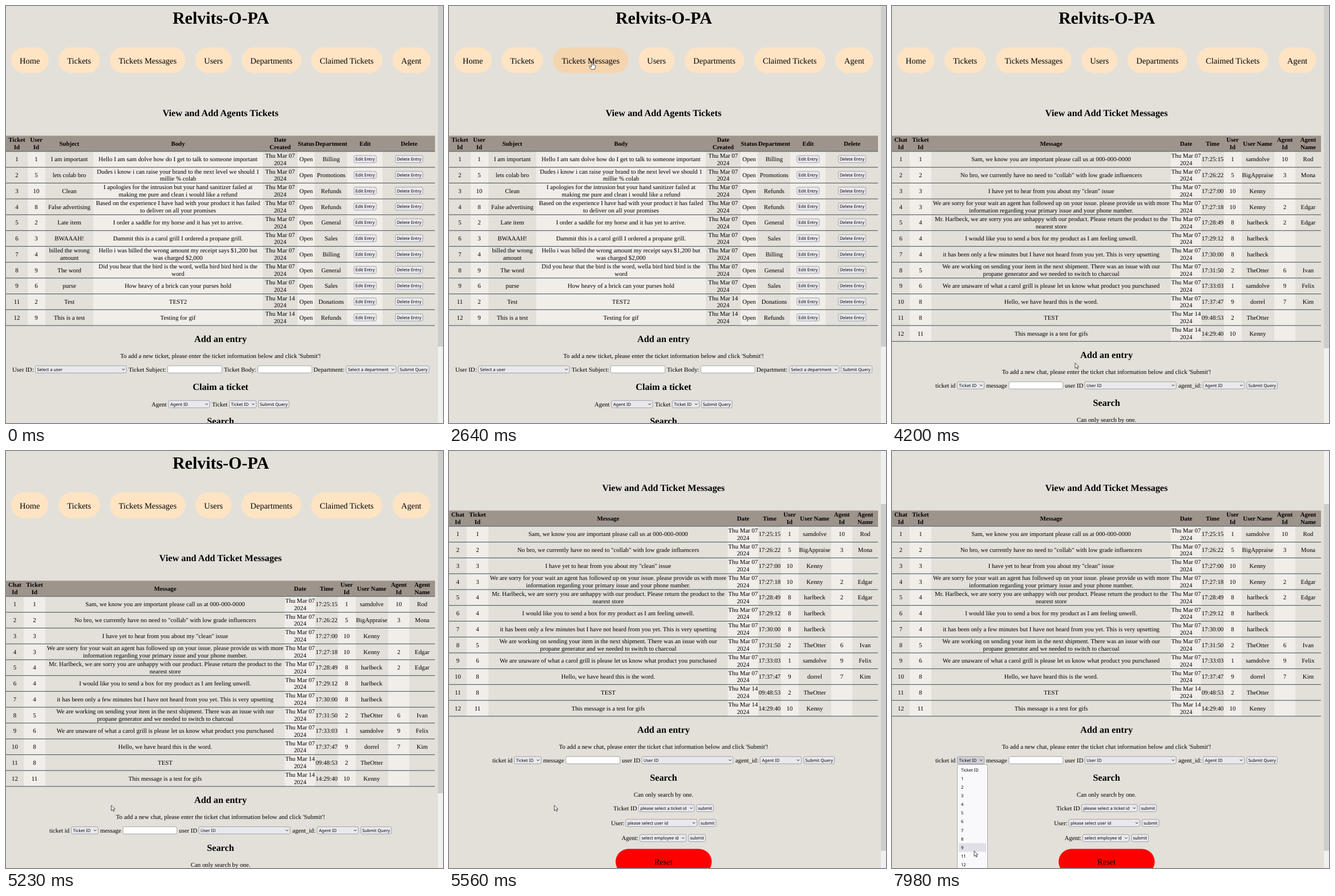
Recreate the animation shown at these times as an HTML page. Size 766 px wide and 731 px high, loop 8 s.

```html
<!DOCTYPE html>
<html lang="en">
<head>
<meta charset="utf-8">
<title>Ticket messages</title>
<style>
  html, body { margin: 0; width: 100%; height: 100%; overflow: hidden; background: #e3e0d9; }
  svg { display: block; font: 10.86px "Liberation Serif", "Times New Roman", serif; text-rendering: geometricPrecision; }
  .mid { text-anchor: middle; }
  .h1 { font-size: 29.95px; font-weight: bold; }
  .h2 { font-size: 16.27px; font-weight: bold; }
  .th { font-weight: bold; }
  .nav { font-size: 14.45px; }
  .ui { font: 7.5px "Noto Sans", "Open Sans", sans-serif; }
  .box { stroke: #8f8f9d; stroke-width: .8; }
</style>
</head>
<body>
<svg id="stage" width="766" height="731" viewBox="0 0 766 731"></svg>
<script>
const ROW = 27.75, MID = 376;
const GREY = '#e9e9ed', BISQUE = '#ffe4c4', HOVER = '#f5d5ae';

const rect = (x, y, w, h, fill, more = '') =>
  `<rect x="${x}" y="${y}" width="${w}" height="${h}" fill="${fill}" ${more}/>`;
const text = (x, y, s, cls = '') => `<text x="${x}" y="${y}" class="${cls}">${s}</text>`;
const mid = (x, y, s, cls = '') => text(x, y, s, 'mid ' + cls);

// Centred cell text; "|" breaks the line
function cell(x, y, s, cls) {
  const lines = s.split('|');
  return lines.map((line, i) => mid(x, y + 3.5 + (i - (lines.length - 1) / 2) * 12.6, line, cls)).join('');
}

// Form parts, placed by left edge, right edge and middle line
const box = (x, r, y, fill, more = '') =>
  rect(x + .4, y - 6.3, r - x - .8, 12.6, fill, `class="box" rx="2.4" ${more}`);
const label = (x, y, s) => text(x, y + 3.5, s);
const input = (x, r, y) => box(x, r, y, '#fff');
const button = (x, r, y, s) => box(x, r, y, GREY) + mid((x + r) / 2, y + 2.7, s, 'ui');
const select = (x, r, y, s, more) => box(x, r, y, GREY, more) + text(x + 3.5, y + 2.7, s, 'ui') +
  `<path d="M${r - 8} ${y - 1.2}l2.2 2.3 2.2-2.3" fill="none" stroke="#222"/>`;

function table(edges, centers, head, rows) {
  const h = rows.length * ROW;
  let out = '';
  for (let i = 1; i < 8; i += 2) out += rect(edges[i], 255, edges[i + 1] - edges[i], h, '#f1ede9');
  out += rect(0, 227.4, 752, 27.5, '#9d948c');
  head.split(';').forEach((s, i) => out += cell(centers[i], 241, s, 'th'));
  rows.forEach((row, n) => {
    const y = 241 + ROW * (n + 1);
    row.split(';').forEach((s, i) => {
      if (/^(Edit|Delete) Entry$/.test(s)) {
        const half = s[0] === 'E' ? 20 : 24.5;
        out += button(centers[i] - half, centers[i] + half, y - .4, s);
      } else out += cell(centers[i], y, s);
    });
  });
  for (let n = 0; n <= rows.length; n++) out += rect(0, 254.3 + ROW * n, 752, 1.2, '#53696c');
  return out;
}
const date = d => `Thu Mar ${d}|2024`;

const tickets = `1;1;I am important;Hello I am sam dolve how do I get to talk to someone important;Billing
2;5;lets colab bro;Dudes i know i can raise your brand to the next level we should 1|millie % colab;Promotions
3;10;Clean;I apologies for the intrusion but your hand sanitizer failed at|making me pure and clean i would like a refund;Refunds
4;8;False advertising;Based on the experience I have had with your product it has failed|to deliver on all your promises;Refunds
5;2;Late item;I order a saddle for my horse and it has yet to arrive.;General
6;3;BWAAAH!;Dammit this is a carol grill I ordered a propane grill.;Sales
7;4;billed the wrong|amount;Hello i was billed the wrong amount my receipt says $1,200 but|was charged $2,000;Billing
8;9;The word;Did you hear that the bird is the word, wella bird bird bird is the|word;General
9;6;purse;How heavy of a brick can your purses hold;Sales
11;2;Test;TEST2;Donations
12;9;This is a test;Testing for gif;Refunds`.split('\n').map(line => {
  const [id, user, subject, body, dept] = line.split(';');
  return [id, user, subject, body, date(id > 10 ? 14 : '07'), 'Open', dept, 'Edit Entry', 'Delete Entry'].join(';');
});

const messages = `1;1;Sam, we know you are important please call us at 000-000-0000;17:25:15;1;samdolve;10;Rod
2;2;No bro, we currently have no need to "collab" with low grade influencers;17:26:22;5;BigAppraise;3;Mona
3;3;I have yet to hear from you about my "clean" issue;17:27:00;10;Kenny
4;3;We are sorry for your wait an agent has followed up on your issue. please provide us with more|information regarding your primary issue and your phone number.;17:27:18;10;Kenny;2;Edgar
5;4;Mr. Harlbeck, we are sorry you are unhappy with our product. Please return the product to the|nearest store;17:28:49;8;harlbeck;2;Edgar
6;4;I would like you to send a box for my product as I am feeling unwell.;17:29:12;8;harlbeck
7;4;it has been only a few minutes but I have not heard from you yet. This is very upsetting;17:30:00;8;harlbeck
8;5;We are working on sending your item in the next shipment. There was an issue with our|propane generator and we needed to switch to charcoal;17:31:50;2;TheOtter;6;Ivan
9;6;We are unaware of what a carol grill is please let us know what product you purschased;17:33:03;1;samdolve;9;Felix
10;8;Hello, we have heard this is the word.;17:37:47;9;dorrel;7;Kim
11;8;TEST;09:48:53;2;TheOtter
12;11;This message is a test for gifs;14:29:40;10;Kenny`.split('\n').map(line => {
  const [id, ticket, body, ...rest] = line.split(';');
  return [id, ticket, body, date(id > 10 ? 14 : '07'), ...rest].join(';');
});

const ticketPage = mid(MID, 193, 'View and Add Agents Tickets', 'h2') +
  table([0, 38, 69, 153, 450, 511, 541, 598, 660], [19, 53, 111, 301.5, 480.5, 526, 570, 629.5, 706.5],
    'Ticket|Id;User|Id;Subject;Body;Date|Created;Status;Department;Edit;Delete', tickets) +
  mid(MID, 589, 'Add an entry', 'h2') +
  mid(MID, 617, "To add a new ticket, please enter the ticket information below and click 'Submit'!") +
  label(11, 637, 'User ID:') + select(51, 211.5, 637, 'Select a user') +
  label(215, 637, 'Ticket Subject:') + input(283, 379, 637) +
  label(382, 637, 'Ticket Body:') + input(441, 536.5, 637) +
  label(539, 637, 'Department:') + select(596, 684, 637, 'Select a department') +
  button(687, 742, 637, 'Submit Query') +
  mid(MID, 673, 'Claim a ticket', 'h2') +
  label(255, 698, 'Agent') + select(284.5, 357.5, 698, 'Agent ID') +
  label(361, 698, 'Ticket') + select(391, 439, 698, 'Ticket ID') + button(442, 496.5, 698, 'Submit Query') +
  mid(MID, 732.5, 'Search', 'h2');

const messagePage = mid(MID, 193, 'View and Add Ticket Messages', 'h2') +
  table([0, 31, 69, 488.5, 542, 582, 613, 670, 707], [15.5, 50, 279, 515.5, 562, 597, 641, 688.5, 729.5],
    'Chat|Id;Ticket|Id;Message;Date;Time;User|Id;User Name;Agent|Id;Agent|Name', messages) +
  mid(MID, 617, 'Add an entry', 'h2') +
  mid(MID, 645, "To add a new chat, please enter the ticket chat information below and click 'Submit'!") +
  label(76, 665, 'ticket id') + select(114, 162, 665, 'Ticket ID', 'id="picker"') +
  label(165, 665, 'message') + input(204.5, 300, 665) +
  label(303, 665, 'user ID') + select(337.5, 498.5, 665, 'User ID') +
  label(502, 665, 'agent_id:') + select(545, 618, 665, 'Agent ID') + button(621.5, 676, 665, 'Submit Query') +
  mid(MID, 701, 'Search', 'h2') + mid(MID, 729, 'Can only search by one.') +
  label(288, 749, 'Ticket ID') + select(332, 430.5, 749, 'please select a ticket id') + button(433.5, 464, 749, 'submit') +
  label(284, 775, 'User:') + select(309.5, 435, 775, 'please select user id') + button(438, 468.5, 775, 'submit') +
  label(302.5, 801.5, 'Agent:') + select(334, 416, 801.5, 'select employee id') + button(419.5, 450, 801.5, 'submit') +
  rect(292, 820.5, 168.5, 45, 'red', 'rx="22.5"') + mid(MID, 848, 'Reset', 'nav');

const pills = [['Home', 9, 74.5], ['Tickets', 92, 164.5], ['Tickets Messages', 182, 314.5], ['Users', 332, 395.5],
  ['Departments', 413, 517.5], ['Claimed Tickets', 535, 659.5], ['Agent', 677.5, 743.5]];
const nav = pills.map(([s, x, r]) =>
  rect(x, 72.5, r - x, 45, BISQUE, 'rx="22.5" class="pill"') + mid((x + r) / 2, 100.5, s, 'nav')).join('');

// Open list of ticket ids
const ITEM = 15.06, LIST = 551.9;
const options = ['Ticket ID', 1, 2, 3, 4, 5, 6, 7, 8, 9, 11, 12];
const list = rect(114.5, 549.5, 53, 200, '#f9f9fb', 'rx="3" stroke="#a9a9b2"') +
  rect(117, LIST, 48, ITEM, '#e0e0e6', 'id="mark"') +
  options.map((s, i) => text(121, LIST + ITEM * (i + .5) + 2.7, s, 'ui')).join('');

document.getElementById('stage').innerHTML = rect(0, 0, 766, 731, '#e3e0d9') +
  `<g id="page">${mid(376.5, 31, 'Relvits-O-PA', 'h1')}${nav}
    <g id="tickets">${ticketPage}</g><g id="messages">${messagePage}</g></g>` +
  rect(757, 0, 9, 731, '#f0f0f0') + rect(757, 0, 9, 608, '#cdcdcd', 'id="thumb"') +
  `<g id="list">${list}</g>
  <g id="cursor" fill="#fff" stroke="#222" stroke-width=".8" stroke-linejoin="round">
    <path id="arrow" d="M.5 .5V10L2.7 8 4.2 11.4 5.8 10.7 4.3 7.4H7.2Z"/>
    <path id="hand" d="M0 1Q1-.5 2 1V5L5.3 5.6 6.6 6.6V9.6L5.4 13H-.8L-4 8.6Q-4.2 7-2.6 7.2L0 9Z"/>
  </g>`;

const $ = id => document.getElementById(id);
const show = (id, on) => $(id).setAttribute('display', on ? 'inline' : 'none');
const pillNodes = document.querySelectorAll('.pill');

// Time, x, y
const path = [[140, 630, 660], [250, 330, 390], [300, 199, 290], [320, 229, 257], [650, 229, 257], [860, 185, 400],
  [1070, 142, 524], [1470, 142, 524], [1720, 150, 300], [1960, 132, 113], [2220, 138, 99], [2300, 145, 99],
  [2620, 250, 98], [3050, 250, 98], [3310, 372.5, 143.5], [3600, 520, 330], [3850, 496, 507], [3920, 495, 511],
  [4250, 290, 645], [4470, 184, 620.5], [5690, 184, 620.5], [6080, 141, 541], [6200, 141, 541], [6430, 143, 563],
  [6500, 143, 565], [6570, 143, 576], [6770, 143, 577], [7040, 143, 595], [7570, 143, 596], [7980, 143.5, 700.5]];
const scrolls = [[5300, 0], [5430, 61.4], [5560, 123]];

function at(keys, t, k) {
  const n = keys.findIndex(key => key[0] > t);
  if (n < 0) return keys[keys.length - 1][k];
  if (n === 0) return keys[0][k];
  const a = keys[n - 1], b = keys[n];
  return a[k] + (b[k] - a[k]) * (t - a[0]) / (b[0] - a[0]);
}

function draw(now) {
  const t = now % 8000;
  const x = at(path, t, 1), y = at(path, t, 2), scroll = at(scrolls, t, 1);
  const second = t >= 2700;
  show('tickets', !second);
  show('messages', second);
  $('page').setAttribute('transform', `translate(0 ${-scroll})`);
  $('thumb').setAttribute('y', second ? -8 + scroll * .82 : -11);

  const over = y > 72 && y < 117.5 ? pills.findIndex(p => x > p[1] && x < p[2]) : -1;
  pillNodes.forEach((p, i) => p.setAttribute('fill', i === over && y < 111 ? HOVER : BISQUE));
  show('cursor', t >= 140);
  show('arrow', over < 0);
  show('hand', over >= 0);
  $('cursor').setAttribute('transform', `translate(${x} ${y})`);

  show('list', t >= 6150);
  $('picker').setAttribute('fill', t >= 6060 ? '#d0d0d7' : GREY);
  $('mark').setAttribute('y', LIST + ITEM * Math.max(0, Math.floor((y - LIST) / ITEM)));
  requestAnimationFrame(draw);
}
requestAnimationFrame(draw);
</script>
</body>
</html>
```
